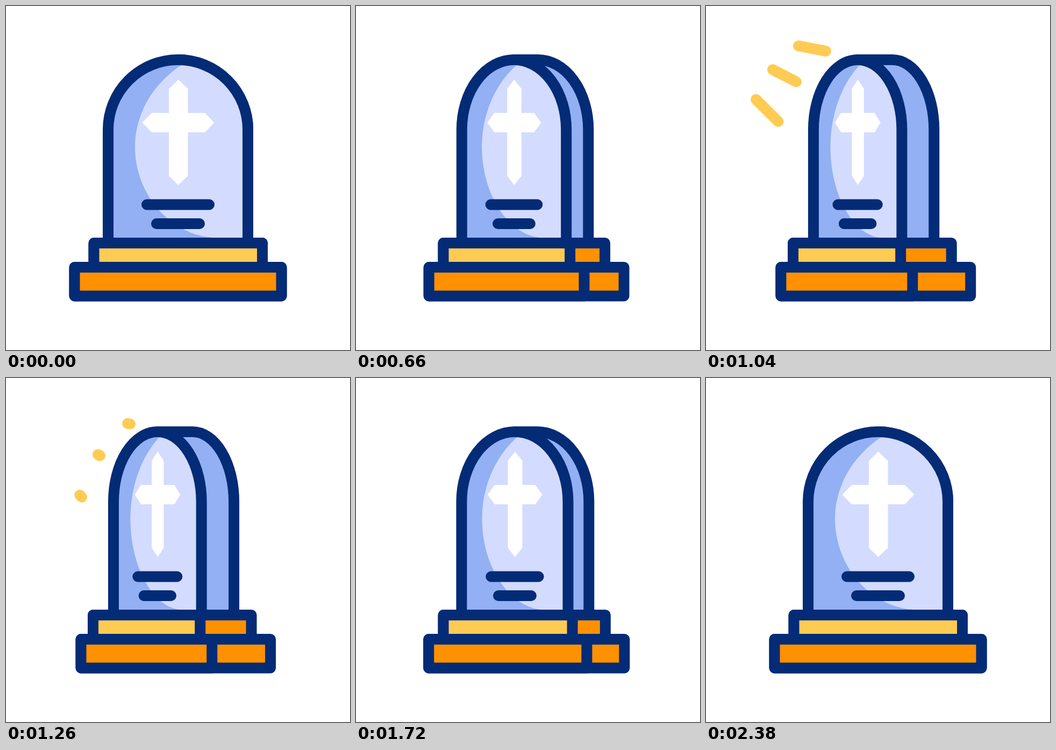
Write an HTML page that moves like this. It is 640 px wide and 640 px high and loops after 2.4 s.

```html
<!DOCTYPE html>
<html lang="en">
<head>
<meta charset="utf-8">
<title>Turning headstone</title>
<style>
  html, body { margin: 0; height: 100%; overflow: hidden; background: #fff; }
  svg { display: block; width: 640px; height: 640px; }
  .ink { stroke: #042b76; stroke-width: 20; stroke-linecap: round; stroke-linejoin: round; }
  .ink, .ink * { vector-effect: non-scaling-stroke; }
  .side { fill: #92b0f3; }
  .light { fill: #d3dcfe; }
  .orange { fill: #ff9100; }
  .yellow { fill: #ffcb52; }
  #sparks { stroke: #ffcb52; stroke-width: 20; stroke-linecap: round; }
</style>
</head>
<body>
<svg viewBox="0 0 640 640">
  <g id="sparks"><path/><path/><path/></g>
  <path id="back" class="ink side"/>
  <g id="front">
    <path class="side" d="M190 441V230A130 130 0 0 1 450 230V441Z"/>
    <path class="light" d="M340 101.5C280 135 240 195 240 262C240 350 305 425 385 431V441H450V230A130 130 0 0 0 340 101.5Z"/>
    <path fill="#fff" d="M320.5 137L338.500 154V199H370L387.500 217L370 235H338.500V316L320.500 333L303 316V235H271L253.500 217L271 199H303V154Z"/>
    <g class="ink" fill="none">
      <path d="M190 441V230A130 130 0 0 1 450 230V441Z"/>
      <path d="M262 369.500H378M280 405H360"/>
    </g>
  </g>
  <path id="upperSide" class="ink orange"/>
  <path id="upperFront" class="ink yellow"/>
  <path id="lowerSide" class="ink orange"/>
  <path id="lowerFront" class="ink orange"/>
</svg>
<script>
const LOOP = 2400, TURN = 1180, RETURN_AT = 1200;
const get = id => document.getElementById(id);
const draw = (id, d) => get(id).setAttribute('d', d);
const mix = (a, b, k) => a + (b - a) * k;
const clamp = k => Math.min(1, Math.max(0, k));
const box = (x1, x2, y1, y2) => `M${x1} ${y1}H${x2}V${y2}H${x1}Z`;

// Cubic ease with handles (x1, 0) and (x2, 1), solved by bisection.
function ease(k, x1, x2) {
  k = clamp(k);
  let lo = 0, hi = 1, s = 0.5;
  for (let i = 0; i < 24; i++) {
    s = (lo + hi) / 2;
    const x = 3 * x1 * s * (1 - s) ** 2 + 3 * x2 * s * s * (1 - s) + s ** 3;
    if (x < k) lo = s; else hi = s;
  }
  return s * s * (3 - 2 * s);
}

// Each spark runs from its outer end to its end beside the stone.
const sparkLines = [
  [140, 68, 231, 85.500],
  [96, 104, 175, 144.500],
  [67, 148, 141, 221.500]
];
const sparkPaths = get('sparks').children;

function drawSparks(t) {
  const head = clamp((t - 850) / 210), tail = clamp((t - 911) / 369);
  get('sparks').style.display = head > tail ? '' : 'none';
  sparkLines.forEach(([x1, y1, x2, y2], i) => {
    const at = k => `${mix(x1, x2, k)} ${mix(y1, y2, k)}`;
    sparkPaths[i].setAttribute('d', `M${at(tail)}L${at(head)}`);
  });
}

function drawStone(p) {
  const left = mix(190, 200, p), right = mix(450, 363.5, p);
  const apex = (left + right) / 2, scale = (right - left) / 260;
  const backApex = mix(320, 347, p), backRight = mix(450, 424, p);
  get('front').setAttribute('transform', `matrix(${scale} 0 0 1 ${left - 190 * scale} 0)`);
  draw('back', `M${apex} 441V100H${backApex}A${backRight - backApex} 130 0 0 1 ${backRight} 230V441Z`);
}

function drawBase(name, left, edge, right, top, bottom) {
  draw(name + 'Side', box(left, right, top, bottom));
  draw(name + 'Front', box(left, edge, top, bottom));
}

function render(t) {
  const p = t < RETURN_AT
    ? ease(t / TURN, 0.77, 0.26)
    : 1 - ease((t - RETURN_AT) / TURN, 0.75, 0.18);
  drawSparks(t);
  drawStone(p);
  drawBase('upper', mix(163.5, 162, p), mix(477, 361, p), mix(477, 456.5, p), 441, 486);
  drawBase('lower', mix(127.5, 139.5, p), mix(512.5, 383, p), mix(512.5, 492, p), 486, 539.5);
}

const start = performance.now();
function tick() {
  render((performance.now() - start) % LOOP);
  requestAnimationFrame(tick);
}
tick();
</script>
</body>
</html>
```
